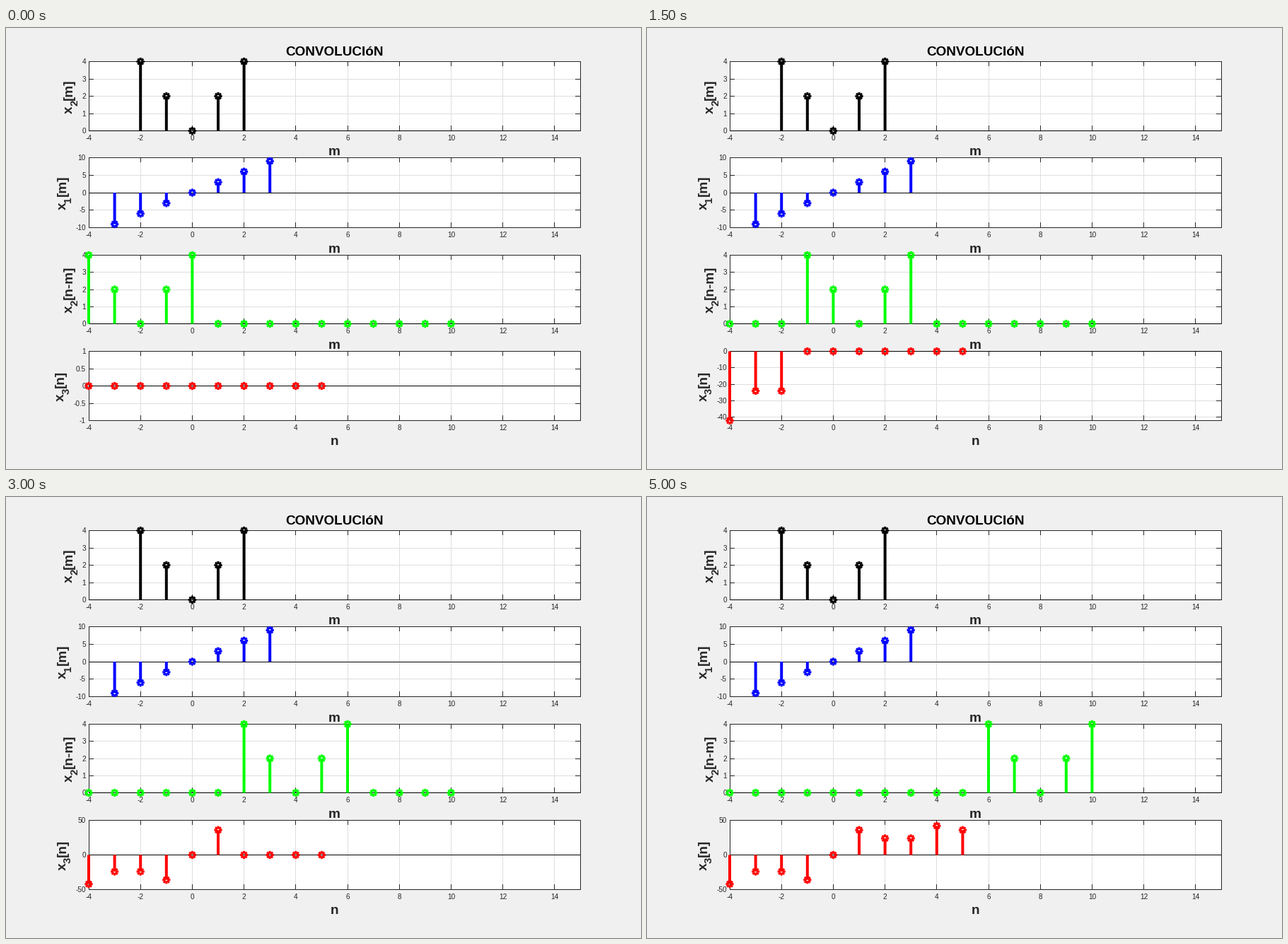
These frames come from a looping animation (898x624 px, 5500 ms). A matplotlib script:

```python
import numpy as np
import matplotlib.pyplot as plt
from matplotlib.animation import FuncAnimation
from matplotlib.collections import LineCollection
from matplotlib.textpath import text_to_path

W, H, DPI = 898, 624, 64
PT = 72 / DPI  # points per pixel
FRAMES, STEP_MS = 11, 500

plt.rcParams["font.family"] = "Liberation Sans"
plt.rcParams["path.simplify"] = False

BACK, INK, GRID = "#f0f0f0", "#262626", "#dedede"
LEFT, RIGHT, UNIT = 117, 812, 36.6
TOPS, BOTTOMS = (47, 183, 321, 457), (145, 282, 418, 555)
TICK = 7
SMALL, LARGE, SUB = 10, 19, 15

# octagonal ring, one butt-ended dash per side
angles = np.radians(22.5 + 45 * np.arange(9))
ring = 3.6 / np.cos(np.pi / 8) * np.column_stack([np.cos(angles), np.sin(angles)])
RING = np.stack([ring[:-1], ring[1:]], axis=1)

fig = plt.figure(figsize=(W / DPI, H / DPI), dpi=DPI, facecolor=BACK)
ax = fig.add_axes([0, 0, 1, 1])


def x1(m):
    return np.where(abs(m) <= 3, 3 * m, 0)


def x2(m):
    return np.where(abs(m) <= 2, 2 * abs(m), 0)


M_X1, M_X2 = np.arange(-3, 4), np.arange(-2, 3)
M_SHIFT, N_OUT = np.arange(-4, 11), np.arange(-4, 6)
CONV = np.array([(x1(M_X1) * x2(n - M_X1)).sum() for n in N_OUT])


def write(x, y, s, size, color=INK, **kw):
    kw = {"ha": "center", "va": "baseline", **kw}
    return ax.text(x, y, s, fontsize=size * PT, color=color, zorder=2, **kw)


def advance(text):
    """Advance width of a text object's string, in pixels."""
    prop, s = text.get_fontproperties(), text.get_text()
    size = lambda t: text_to_path.get_text_width_height_descent(t, prop, False)[0]
    return (size(f"|{s}|") - size("||")) / PT


def segments(segs, color, width, z):
    ax.add_collection(LineCollection(segs, colors=color, linewidths=width * PT,
                                     capstyle="butt", snap=False, zorder=z),
                      autolim=False)


def hline(y, xa, xb):
    return [(xa, y + 0.5), (xb, y + 0.5)]


def vline(x, ya, yb):
    return [(x + 0.5, ya), (x + 0.5, yb)]


def side_label(x, y, parts):
    """Upright label; every second part is a subscript."""
    texts = [write(0, 0, s, SUB if i % 2 else LARGE, weight="bold", ha="left",
                   rotation=90, rotation_mode="anchor")
             for i, s in enumerate(parts)]
    widths = [advance(t) for t in texts]
    y += sum(widths) / 2
    for i, (t, w) in enumerate(zip(texts, widths)):
        t.set_position((x + 7 * (i % 2), y))
        y -= w


def panel(row, xs, ys, color, limits, ticks, xlabel, ylabel):
    top, bottom = TOPS[row], BOTTOMS[row]
    lo, hi = limits

    def px(v):
        return LEFT + UNIT * (v + 4)

    def py(v):
        return bottom + 0.5 - (v - lo) / (hi - lo) * (bottom - top)

    ax.fill([LEFT, RIGHT, RIGHT, LEFT], [top, top, bottom, bottom],
            color="white", lw=0, zorder=0)

    grid = []
    frame = [hline(top, LEFT, RIGHT + 1), hline(bottom, LEFT, RIGHT + 1),
             vline(LEFT, top, bottom + 1), vline(RIGHT, top, bottom + 1)]
    for v in range(-4, 15, 2):
        x = int(px(v))
        grid.append(vline(x, top, bottom))
        frame += [vline(x, top, top + TICK), vline(x, bottom - TICK, bottom)]
        write(px(v), bottom + 14, str(v), SMALL)

    tick_texts = []
    for v in ticks:
        y = int(py(v))
        grid.append(hline(y, LEFT, RIGHT))
        frame += [hline(y, LEFT, LEFT + TICK), hline(y, RIGHT - TICK, RIGHT)]
        tick_texts.append(write(113, y + 4, f"{v:g}", SMALL, ha="right"))

    segments(grid, GRID, 1, 1)
    segments(frame, INK, 1, 1.1)
    segments([hline(int(py(0)), LEFT, RIGHT)], "black", 1, 1.2)

    xs, ys = px(np.asarray(xs)), py(np.asarray(ys))
    segments([[(x, py(0)), (x, y)] for x, y in zip(xs, ys)], color, 4, 3)
    rings = [side + (x, y) for x, y in zip(xs, ys) for side in RING]
    segments(rings, color, 4, 3.1)

    mid = (LEFT + RIGHT) / 2
    write(mid, bottom + 35.5, xlabel, LARGE, weight="bold")
    widest = max(advance(t) for t in tick_texts)
    side_label(99.6 - widest, (top + bottom) / 2 + 0.5, ylabel)


def out_axis(values):
    if not values.any():
        return (-1, 1), np.arange(-1, 1.1, 0.5)
    if values.max() <= 0:
        return (values.min(), 0), range(-40, 1, 10)
    return (-50, 50), (-50, 0, 50)


def draw(k):
    ax.clear()
    ax.set(xlim=(0, W), ylim=(H, 0))
    ax.axis("off")

    write((LEFT + RIGHT) / 2, 39, "CONVOLUCIóN", LARGE, "black", weight="bold")
    panel(0, M_X2, x2(M_X2), "black", (0, 4), range(5), "m", ("x", "2", "[m]"))
    panel(1, M_X1, x1(M_X1), "blue", (-10, 10), range(-10, 11, 5),
          "m", ("x", "1", "[m]"))
    panel(2, M_SHIFT, x2(k - 2 - M_SHIFT), "lime", (0, 4), range(5),
          "m", ("x", "2", "[n-m]"))

    out = np.where(N_OUT < k - 4, CONV, 0)
    panel(3, N_OUT, out, "red", *out_axis(out), "n", ("x", "3", "[n]"))
    return []


anim = FuncAnimation(fig, draw, frames=FRAMES, init_func=lambda: [],
                     interval=STEP_MS, repeat=True, repeat_delay=0)
plt.show()
```
